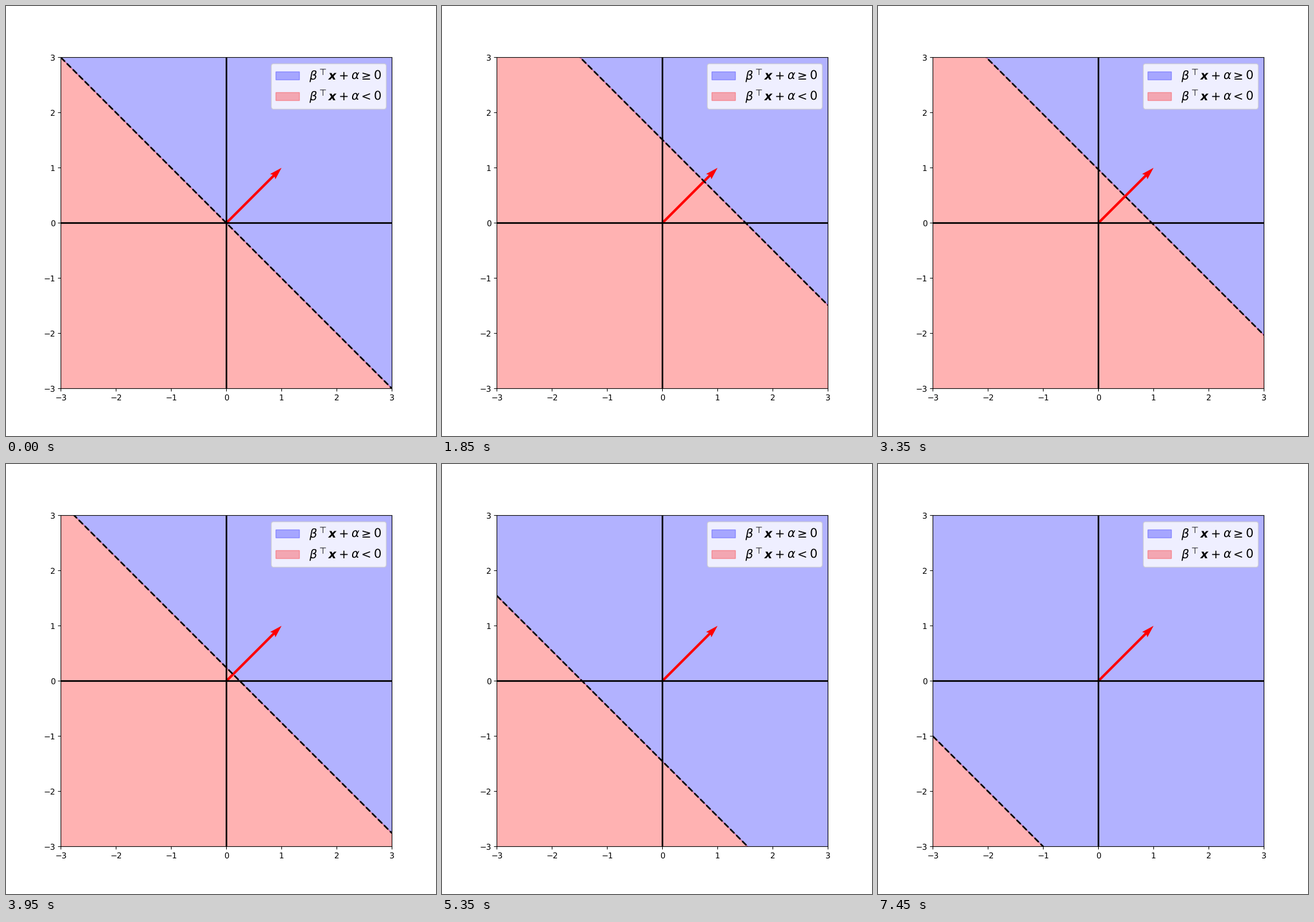
Recreate the animation shown at these times as a matplotlib script. Size 748 px wide and 748 px high, loop 7.5 s.

```python
import matplotlib.pyplot as plt
import numpy as np
from matplotlib.animation import FuncAnimation

LIM, FAR = 3, 10
DPI = 100
X = np.array([-LIM, LIM])

# unhinted glyphs keep the math labels compact
plt.rcParams["text.hinting"] = "none"

# offset of the boundary line: rise to 2, then fall to -4
offsets = np.concatenate([np.linspace(0, 2, 50), np.linspace(2, -4, 100)])

fig, ax = plt.subplots(figsize=(748 / DPI, 748 / DPI), dpi=DPI)
# nudge so that the axes snap to the upper pixel row
fig.subplots_adjust(bottom=0.11035, top=0.88035)
ax.set_aspect("equal")
ax.axhline(0, color="black", lw=2)
ax.axvline(0, color="black", lw=2)

upper = ax.fill_between(X, -X, FAR, color="blue", alpha=0.3,
                        label=r"$\beta^\top \boldsymbol{x} + \alpha \geq 0$")
lower = ax.fill_between(X, -FAR, -X, color="red", alpha=0.3,
                        label=r"$\beta^\top \boldsymbol{x} + \alpha < 0$")
border, = ax.plot(X, -X, "--", color="black", lw=2)
ax.quiver(0, 0, 1, 1, color="red", angles="xy", scale_units="xy", scale=1)

ax.set_xlim(-LIM, LIM)
ax.set_ylim(-LIM, LIM)
ax.legend(loc="upper right", fontsize=15, borderpad=0.37, labelspacing=0.43)


def half_plane(y, edge):
    """Region between the boundary and a horizontal edge out of view."""
    return [[(X[0], y[0]), (X[1], y[1]), (X[1], edge), (X[0], edge)]]


def update(i):
    y = offsets[i] - X
    upper.set_verts(half_plane(y, FAR))
    lower.set_verts(half_plane(y, -FAR))
    border.set_ydata(y)
    return upper, lower, border


anim = FuncAnimation(fig, update, frames=len(offsets), interval=50,
                     repeat=True, repeat_delay=0)
plt.show()
```
